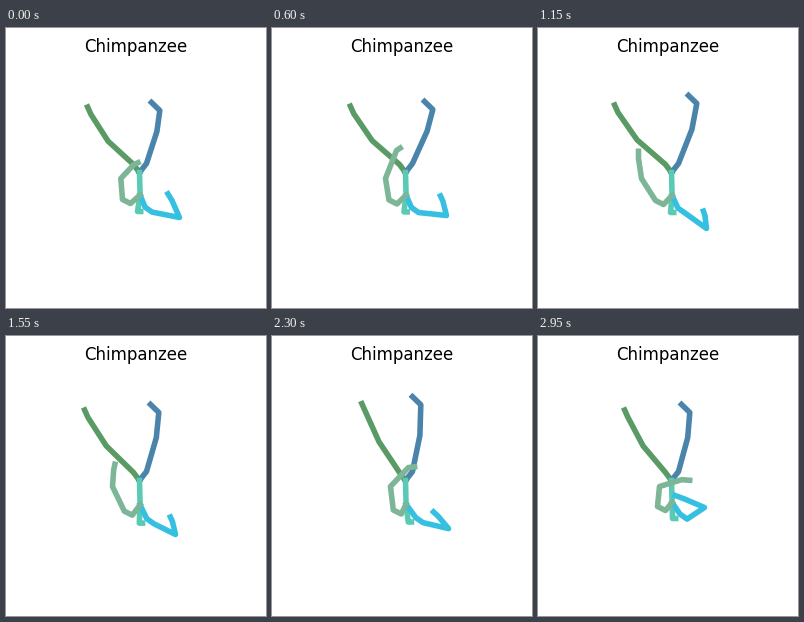
Write a matplotlib script that moves like this. It is 260 by 280 pixels and loops after 3000 ms.

```python
import matplotlib.pyplot as plt
import numpy as np
from matplotlib.animation import FuncAnimation

W, H, DPI = 260, 280, 100
STEP, FRAMES = 50, 60
LINE = 4                           # line width in points
CAP = LINE * DPI / 72 / 2          # how far a cap sticks out, in pixels
SHOULDER = np.array((133, 144))


def path(*keys):
    """Smooth motion through (seconds, x, y) keys that never overshoots."""
    keys = np.array(keys, float)
    x, y = keys[:, 0], keys[:, 1:]
    h = np.diff(x)[:, None]
    d = np.diff(y, axis=0) / h
    a, b = d[:-1], d[1:]
    same = a * b > 0
    slope = np.zeros_like(y)
    slope[1:-1] = np.where(same, 2 * a * b / np.where(same, a + b, 1), 0)
    slope[0], slope[-1] = d[0], d[-1]

    def at(t):
        i = min(np.searchsorted(x, t, side="right") - 1, len(h) - 1)
        w = h[i, 0]
        u = (t - x[i]) / w
        return (y[i] * (1 + 2 * u) * (1 - u) ** 2
                + w * slope[i] * u * (1 - u) ** 2
                + y[i + 1] * u * u * (3 - 2 * u)
                + w * slope[i + 1] * u * u * (u - 1))

    return at


# Only the ends of the limbs are steered; all other joints follow from them
left_hand = path((0, 80, 76), (1.15, 75, 74), (1.55, 77, 71),
                 (1.95, 89, 63), (2.95, 85, 71))
right_hand = path((0, 143, 72), (0.6, 150, 71), (1.15, 148, 65),
                  (1.55, 142, 66), (1.95, 135, 58), (2.65, 141, 59),
                  (2.95, 141, 66))
left_foot = path((0, 134, 133), (0.6, 130, 118), (1.15, 100, 120),
                 (1.55, 109, 125), (1.95, 141, 130), (2.65, 148, 130),
                 (2.95, 154, 144))
right_heel = path((0, 173, 189), (0.6, 174, 187), (1.15, 168, 200),
                  (1.55, 169, 198), (1.95, 175, 189), (2.2, 177, 193),
                  (2.65, 168, 182), (2.95, 166, 171))
right_sole = path((0, -13, -26), (1.15, -4, -20), (1.95, -11, -20),
                  (2.95, -32, -13))
tail = path((0, 131, 183), (1.15, 132, 184), (1.95, 134, 189),
            (2.65, 137, 182), (2.95, 134, 182))


def arm(hand, wrist, follow, elbow, collar):
    """The elbow copies a share of the hand's movement."""
    return [hand, hand + wrist, np.multiply(follow, hand) + elbow,
            collar, SHOULDER]


def pose(t):
    root = tail(t)
    hip = np.array((133.6, 166 + (root[1] - 182) / 2))

    foot = left_foot(t)
    swing = foot[0] - 100
    ankle = foot + (-0.2 * swing, 10 - 0.2 * swing)
    knee = (103 + swing / 3, 150)

    heel, sole = right_heel(t), right_sole(t)

    return (
        arm(left_hand(t), (4.5, 10), (0.6, 0.65), (53.6, 63.3), (127, 136)),
        arm(right_hand(t), (10.3, 10), (0.6, 0.3), (64.6, 81.4), (140, 135)),
        [root + (6, 0), root, hip, SHOULDER],
        [heel + sole, heel + 0.65 * sole + (1, 0), heel,
         root + (14.6, 0.6), root + (7.5, -4.4), hip],
        [foot, ankle, knee, root + (-15, -12), root + (-7, -8), hip],
    )


def trim(points):
    """Pull the free end in so that its cap ends on the first point."""
    tip, after = points[:2]
    along = after - tip
    return [tip + along * CAP / np.hypot(*along), *points[1:]]


fig = plt.figure(figsize=(W / DPI, H / DPI), dpi=DPI, facecolor="white")
ax = fig.add_axes((0, 0, 1, 1))
ax.set(xlim=(-0.5, W - 0.5), ylim=(H - 0.5, -0.5))   # whole = pixel centre
ax.axis("off")
fig.text(0.5, 1 - 24 / H, "Chimpanzee", fontsize=12, family="DejaVu Sans",
         ha="center", va="baseline")

COLORS = ("#5a9a64", "#4a84ab", "#5acab5", "#35c0e2", "#7db597")
lines = [ax.plot([], [], color=c, lw=LINE)[0] for c in COLORS]


def draw(frame):
    for line, points in zip(lines, pose(frame * STEP / 1000)):
        line.set_data(*np.transpose(trim(points)))
    return lines


anim = FuncAnimation(fig, draw, frames=FRAMES, interval=STEP,
                     repeat=True, repeat_delay=0)
plt.show()
```
